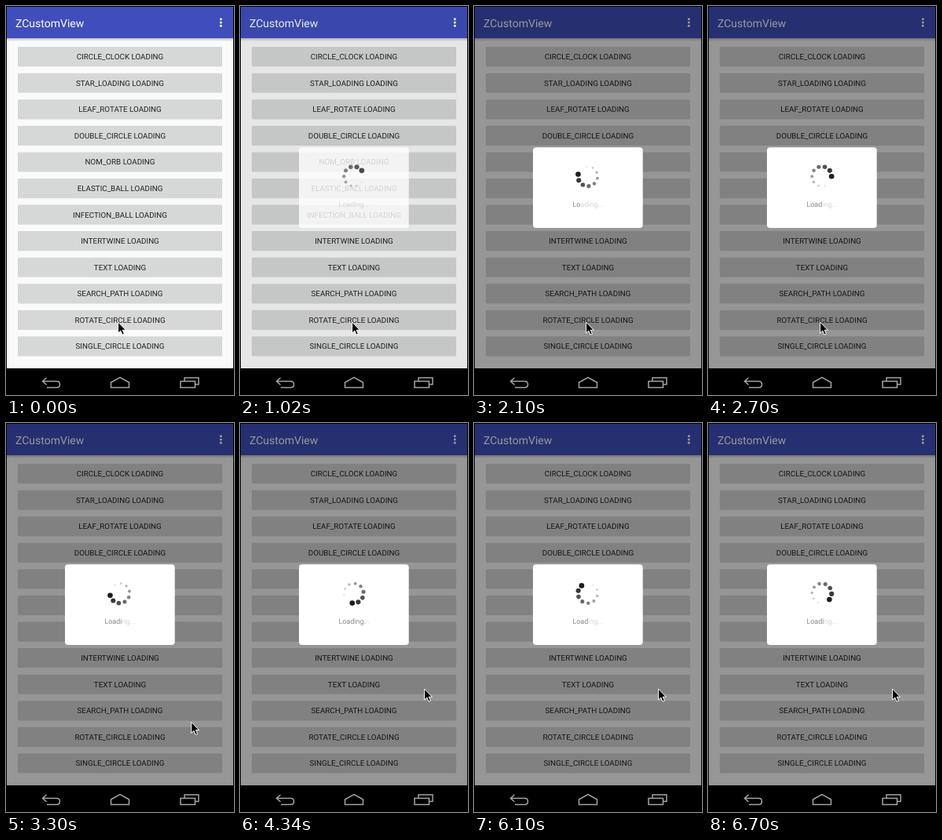
Write an HTML page with a canvas that moves like this. It is 290 px wide and 496 px high and loops after 6740 ms.

```html
<!DOCTYPE html>
<html lang="en">
<head>
<meta charset="utf-8">
<title>ZCustomView</title>
<style>
  html, body { margin: 0; width: 100%; height: 100%; overflow: hidden; background: #000; }
  canvas { display: block; }
</style>
</head>
<body>
<canvas id="stage" width="290" height="496"></canvas>
<script>
const ctx = document.getElementById('stage').getContext('2d');
const LOOP = 6740, TICK = 40;
const LABELS = ['CIRCLE_CLOCK', 'STAR_LOADING', 'LEAF_ROTATE', 'DOUBLE_CIRCLE', 'NOM_ORB',
  'ELASTIC_BALL', 'INFECTION_BALL', 'INTERTWINE', 'TEXT', 'SEARCH_PATH', 'ROTATE_CIRCLE', 'SINGLE_CIRCLE'];
// Opening of the dialog: [time, dim, dialog opacity]
const OPENING = [[0, 0, 0], [860, .03, .3], [940, .08, .8], [1020, .16, 1], [1100, .28, 1], [1140, .4, 1]];
// Pointer path: [time, x, y]
const POINTER = [[2960, 142, 402], [3300, 241, 379], [3500, 271, 360], [3780, 234, 338]];
const SPIN_START = 1300, SPIN_SPEED = .2798, TEXT_CYCLE = 3400;

function rect(x, y, w, h, color, radius = 0) {
  ctx.fillStyle = color;
  ctx.beginPath();
  ctx.roundRect(x, y, w, h, radius);
  ctx.fill();
}

function dot(x, y, r, color) {
  ctx.fillStyle = color;
  ctx.beginPath();
  ctx.arc(x, y, r, 0, 2 * Math.PI);
  ctx.fill();
}

function text(str, x, y, size, color, align = 'left') {
  ctx.font = `${size}px Roboto, sans-serif`;
  ctx.textAlign = align;
  ctx.fillStyle = color;
  ctx.fillText(str, x, y);
}

function drawScreen() {
  rect(0, 0, 290, 496, '#000');
  rect(1, 1, 288, 461, '#fafafa');
  const shadow = ctx.createLinearGradient(0, 41, 0, 45);
  shadow.addColorStop(0, 'rgba(0,0,0,.25)');
  shadow.addColorStop(1, 'rgba(0,0,0,0)');
  rect(1, 41, 288, 4, shadow);
  rect(1, 1, 288, 40, '#3f4ebb');
  text('ZCustomView', 12, 26.5, 14, '#fff');
  for (const y of [16.7, 21, 25.3]) dot(273.3, y, 1.5, '#fff');
  LABELS.forEach((label, i) => {
    const y = 64.7 + i * 33.57;
    rect(15, y - 12.6, 260, 25.2, '#d6d7d7', 1.4);
    text(label + ' LOADING', 145, y + 3.5, 9.8, '#222', 'center');
  });
}

function drawNavigation() {
  ctx.strokeStyle = '#a4a4a4';
  ctx.lineWidth = 1.5;
  ctx.stroke(new Path2D(`M51.5 474L46.5 478.5L51.5 483M46.5 478.5H64.5Q68.5 478.5 68.5 482.5T64.5 486.5H52
    M133.5 486.5V480L145 473.5L156.5 480V486.5Z
    M222 478.5H240.5V486.5H222ZM227 478.5V474H245V482.5H240.5`));
}

function drawSpinner(t) {
  const head = t < SPIN_START ? -36 : -26 + (t - SPIN_START) * SPIN_SPEED;
  for (let i = 1; i < 10; i++) {
    const a = (head - 36 * (9 - i)) * Math.PI / 180;
    dot(144.7 + 12.5 * Math.cos(a), 217.2 + 12.5 * Math.sin(a), .9 + .27 * i, `rgba(0,0,0,${i / 10.2})`);
  }
}

function drawDialog(t, opacity) {
  const caption = 'Loading...';
  const progress = Math.max(0, t - SPIN_START) % TEXT_CYCLE / TEXT_CYCLE;
  ctx.globalAlpha = opacity;
  rect(75, 180.3, 139.7, 102.7, '#fff', 4);
  drawSpinner(t);
  text(caption, 125.3, 256.3, 9, 'rgba(150,150,150,.4)');
  text(caption.slice(0, Math.floor(progress * caption.length)), 125.3, 256.3, 9, '#969696');
  ctx.globalAlpha = 1;
}

function pointerAt(t) {
  const next = POINTER.findIndex(p => p[0] > t);
  if (next === 0) return POINTER[0].slice(1);
  if (next < 0) return POINTER.at(-1).slice(1);
  const [t0, x0, y0] = POINTER[next - 1], [t1, x1, y1] = POINTER[next];
  const k = (t - t0) / (t1 - t0);
  return [x0 + (x1 - x0) * k, y0 + (y1 - y0) * k];
}

function drawPointer(t) {
  ctx.save();
  ctx.translate(...pointerAt(t));
  const arrow = new Path2D('M.6 1V15L3.8 12L6 17.2L8.4 16.2L6.2 11.2H10.4Z');
  ctx.fillStyle = '#000';
  ctx.strokeStyle = '#fff';
  ctx.lineWidth = 1;
  ctx.fill(arrow);
  ctx.stroke(arrow);
  ctx.restore();
}

function draw(now) {
  const t = Math.floor(now % LOOP / TICK) * TICK;
  const [, dim, opacity] = OPENING.findLast(step => step[0] <= t);
  drawScreen();
  rect(1, 1, 288, 461, `rgba(0,0,0,${dim})`);
  drawNavigation();
  if (opacity) drawDialog(t, opacity);
  drawPointer(t);
}

const start = performance.now();
function frame() {
  draw(performance.now() - start);
  requestAnimationFrame(frame);
}
ctx.textRendering = 'geometricPrecision';
frame();
</script>
</body>
</html>
```
